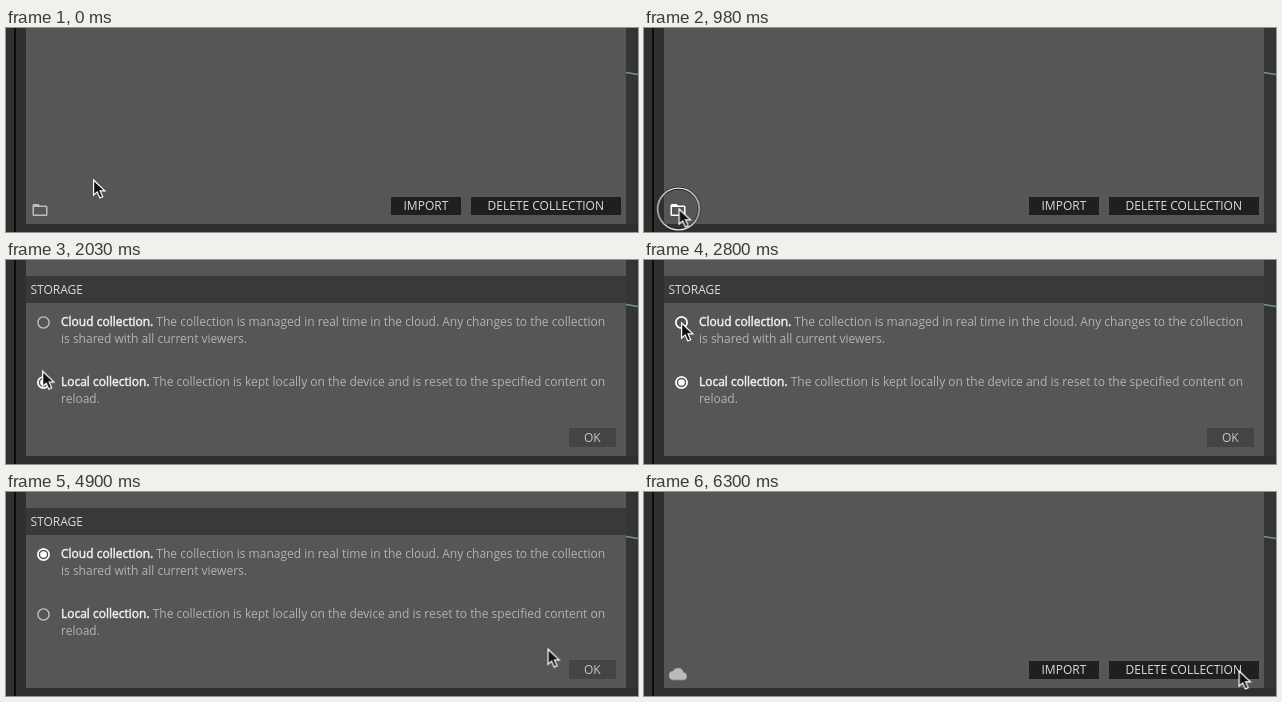
An HTML page for the animation above (6580 ms loop, 632 px wide and 204 px high).

```html
<!DOCTYPE html>
<html lang="en">
<head>
<meta charset="utf-8">
<title>Collection storage</title>
<style>
  html, body { margin: 0; width: 100%; height: 100%; overflow: hidden; background: #302f30; }
  svg { display: block; width: 632px; height: 204px; }
  text { font: 12px "Open Sans", sans-serif; fill: #b2b2b2; }
  .label { fill: #dcdcdc; }
  .bold { fill: #f2f2f2; stroke: #f2f2f2; stroke-width: .45px; }
  .btn { fill: #1f1f1f; }
  .radio { fill: none; stroke: #c8c8c8; stroke-width: 1.3; }
  .on { stroke: #fff; stroke-width: 1.5; }
  .dot { fill: #fff; }

  /* Every animation shares one 6580 ms loop */
  .storage, .folder, .cloud, .hover, .pick-cloud, .pick-local, .ring {
    animation: 6580ms step-end infinite;
  }
  .storage { animation-name: storage; }
  .folder { fill: #bdbdbd; animation-name: folder; }
  .cloud { fill: #bababa; animation-name: cloud; }
  .hover { animation-name: hover; }
  .pick-cloud { animation-name: pick-cloud; }
  .pick-local { animation-name: pick-local; }
  .ring { animation-name: ring; fill: none; }
  .cursor { animation: move 6580ms linear infinite; }

  @keyframes storage {
    0%, 88.29% { visibility: hidden; }
    15.95% { visibility: visible; }
  }
  @keyframes folder {
    0% { fill: #bdbdbd; visibility: visible; }
    8.51% { fill: #fff; visibility: visible; }
    88.29%, 100% { fill: #fff; visibility: hidden; }
  }
  @keyframes cloud {
    0% { opacity: 0; }
    88.29%, 100% { opacity: 1; }
  }
  @keyframes hover {
    0%, 63.82% { opacity: 0; }
    34.04% { opacity: 1; }
  }
  @keyframes pick-cloud {
    0% { opacity: 0; }
    45.74%, 100% { opacity: 1; }
  }
  @keyframes pick-local {
    0% { opacity: 1; }
    45.74%, 100% { opacity: 0; }
  }
  @keyframes ring {
    0%, 15.95%, 45.74%, 88.29% { opacity: 0; }
    13.82%, 43.61%, 86.16% { opacity: 1; }
  }
  @keyframes move {
    0% { transform: translate(87px, 151px); animation-timing-function: ease-in-out; }
    9.574%, 24.468% { transform: translate(34.5px, 180px); }
    24.468% { animation-timing-function: ease-in-out; }
    35.106%, 36.17% { transform: translate(37px, 64px); }
    38.298%, 63.83% { transform: translate(37px, 62px); }
    63.83% { animation-timing-function: cubic-bezier(.36, 0, .7, .84); }
    74.468% { transform: translate(541px, 156px); animation-timing-function: cubic-bezier(.3, .5, .6, 1); }
    77.66%, 100% { transform: translate(594.5px, 178px); }
  }
</style>
</head>
<body>
<svg viewBox="0 0 632 204" xmlns="http://www.w3.org/2000/svg">
  <!-- Window behind the panel -->
  <rect width="632" height="204" fill="#302f30"/>
  <rect x="8" width="2" height="204" fill="#0a0a0a"/>
  <rect x="620" width="12" height="196" fill="#353535"/>
  <path d="M620 44.5 L632 46.5" stroke="#6a9a8e" stroke-width="1.3"/>
  <rect x="20" width="600" height="196" fill="#565656"/>

  <!-- Collection page -->
  <rect class="btn" x="385" y="169" width="70" height="18"/>
  <rect class="btn" x="465" y="169" width="150" height="18"/>
  <text class="label" x="397.5" y="182">IMPORT</text>
  <text class="label" x="481.5" y="182">DELETE COLLECTION</text>
  <g transform="translate(25 173) scale(.75)">
    <path class="folder" d="M20 6h-8l-2-2H4a2 2 0 0 0-2 2v12a2 2 0 0 0 2 2h16a2 2 0 0 0 2-2V8a2 2 0 0 0-2-2zm0 12H4V8h16z"/>
    <path class="cloud" d="M19.35 10.04A7.49 7.49 0 0 0 12 4 7.49 7.49 0 0 0 5.36 8.04 6 6 0 0 0 6 20h13a5 5 0 0 0 .35-9.96z"/>
  </g>

  <!-- Storage page -->
  <g class="storage">
    <rect x="20" y="16" width="600" height="180" fill="#565656"/>
    <rect x="20" y="16" width="600" height="27" fill="#393939"/>
    <text class="label" x="24.5" y="34">STORAGE</text>

    <text x="55" y="66"><tspan class="bold">Cloud collection.</tspan> The collection is managed in real time in the cloud. Any changes to the collection</text>
    <text x="55" y="83">is shared with all current viewers.</text>
    <text x="55" y="126"><tspan class="bold">Local collection.</tspan> The collection is kept locally on the device and is reset to the specified content on</text>
    <text x="55" y="143">reload.</text>

    <circle class="radio" cx="37.5" cy="62.5" r="5.6"/>
    <circle class="radio on hover" cx="37.5" cy="62.5" r="5.6"/>
    <g class="pick-cloud">
      <circle class="radio on" cx="37.5" cy="62.5" r="5.6"/>
      <circle class="dot" cx="37.5" cy="62.5" r="3.3"/>
    </g>
    <circle class="radio" cx="37.5" cy="122.5" r="5.6"/>
    <g class="pick-local">
      <circle class="radio on" cx="37.5" cy="122.5" r="5.6"/>
      <circle class="dot" cx="37.5" cy="122.5" r="3.3"/>
    </g>

    <rect x="563" y="168" width="47" height="19" fill="#444"/>
    <text x="578" y="182" style="fill:#c4c4c4">OK</text>
  </g>

  <!-- Pointer with click ring -->
  <g class="cursor">
    <g class="ring">
      <circle cy="1" r="20.8" stroke="#222" stroke-width="3"/>
      <circle cy="1" r="20.8" stroke="#eee" stroke-width="1.2"/>
    </g>
    <path d="M.6 1V16.2L4.2 12.9L6.9 18.9L9.7 17.7L7.1 11.9H11.9Z" fill="#111" stroke="#fff" stroke-width="1.2"/>
  </g>
</svg>
</body>
</html>
```
